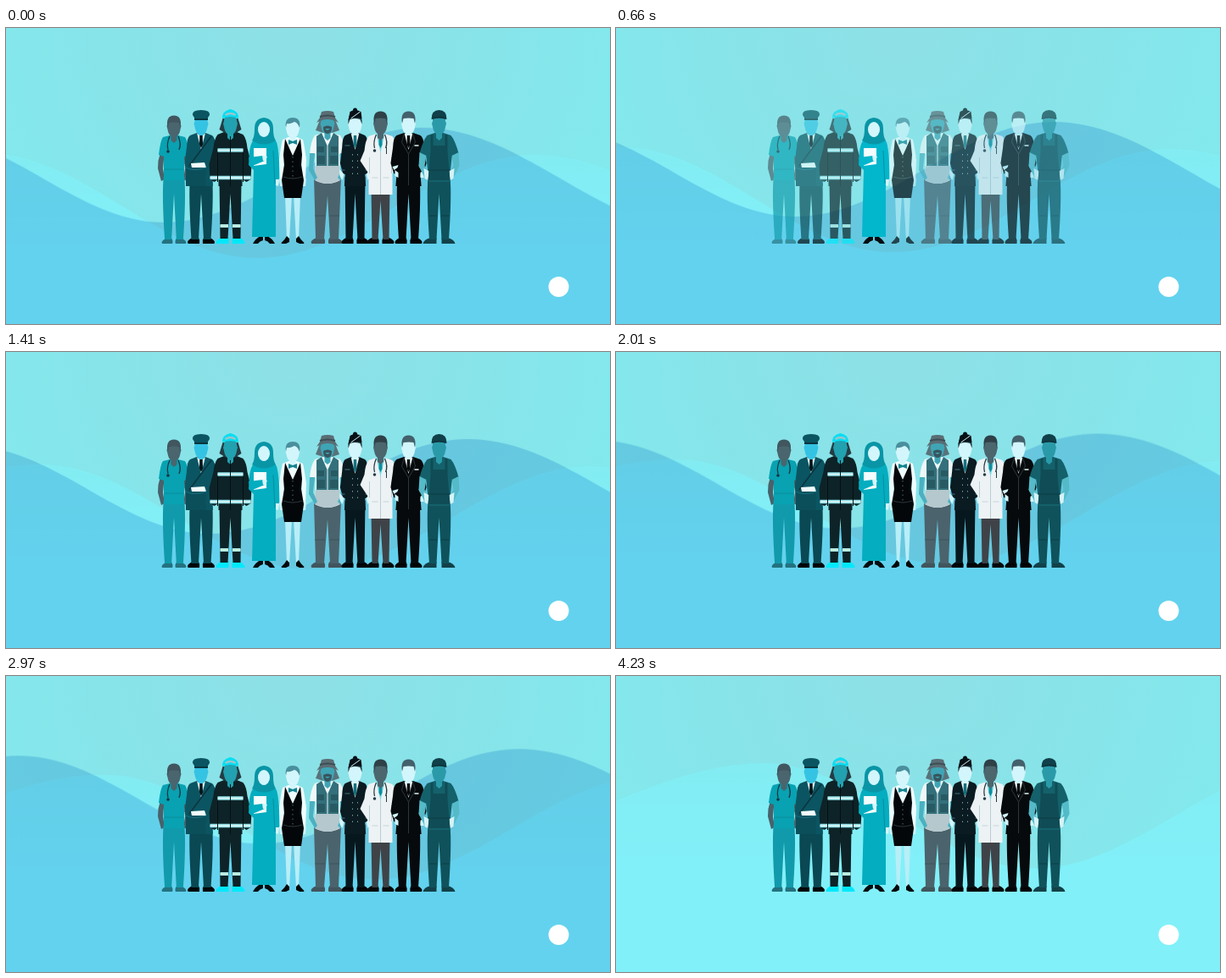
Recreate the animation shown at these times as an HTML page without scripts. Size 712 px wide and 350 px high, loop 4260 ms.

```html
<!DOCTYPE html>
<html lang="en">
<head>
<meta charset="utf-8">
<title>Team on the waves</title>
<style>
html, body { margin: 0; width: 100%; height: 100%; overflow: hidden; background: #82eaee; }
svg { display: block; width: 712px; height: 350px; }
.light { fill: url(#glow); animation: drift 4.26s linear infinite; }
.dark { fill: #c2dff4; mix-blend-mode: multiply; animation: rise 4.26s linear infinite; }
.crew { animation: appear 4.26s linear infinite; }
.robed { animation: appear-fast 4.26s linear infinite; }
.robe { fill: #04adbf; animation: tint 4.26s linear infinite; }
@keyframes drift {
  to { transform: translate(200px, -45px); }
}
@keyframes rise {
  0% { transform: none; opacity: 1; }
  70.42% { transform: translate(116px, -32px); opacity: 1; }
  88.73% { transform: translate(116px, -32px); opacity: 1; }
  99.3%, 100% { transform: translate(116px, -32px); opacity: 0; }
}
@keyframes appear {
  0%, .69% { opacity: 1; }
  .7% { opacity: .08; }
  23.5%, 100% { opacity: 1; }
}
@keyframes appear-fast {
  0%, .69% { opacity: 1; }
  .7% { opacity: .08; }
  10%, 100% { opacity: 1; }
}
@keyframes tint {
  0%, .69% { fill: #04adbf; }
  .7%, 10% { fill: #00bfd9; }
  21%, 100% { fill: #04adbf; }
}
</style>
</head>
<body>
<svg viewBox="0 0 712 350" width="712" height="350">
  <defs>
    <radialGradient id="sky" gradientUnits="userSpaceOnUse" cx="340" cy="-10" r="440">
      <stop offset="0" stop-color="#8ee0e6"/>
      <stop offset=".5" stop-color="#87e4e9"/>
      <stop offset="1" stop-color="#82eaee"/>
    </radialGradient>
    <linearGradient id="glow" gradientUnits="userSpaceOnUse" x1="0" y1="140" x2="0" y2="260">
      <stop offset="0" stop-color="#83ecf2"/>
      <stop offset="1" stop-color="#82f0f9"/>
    </linearGradient>
    <path id="legs" d="M-13 176H13Q15 200 11.500 250H3L0 196L-3 250H-11.500Q-15 200-13 176Z"/>
    <path id="shoes" d="M-16 253Q-15 250-10 248H-3Q-1 251-2 255H-15Q-16 255-16 253ZM16 253Q15 250 10 248H3Q1 251 2 255H15Q16 255 16 253Z"/>
    <path id="head" d="M-7.500 110Q-8 103 0 103T7.500 110L8.500 113L7.500 117Q6.500 123 3.500 125V130L0 133L-3.500 130V125Q-6.500 123-7.500 117L-8.500 113Z"/>
    <path id="hair" d="M-7.500 113Q-10 98.500 0 98.500T7.500 113L6 107Q0 106-6 107Z"/>
    <path id="coat" d="M-5 124L-13 127Q-16.500 129-17 141L-19.500 160L-16 172L-13 173L-14 187H14L13 173L16 172L19.500 160L17 141Q16.500 129 13 127L5 124Z"/>
    <path id="collar" d="M-5 124L0 144L5 124L2 127H-2Z"/>
    <path id="tie" d="M-1.700 127H1.700L2 138L0 142L-2 138Z"/>
    <path id="hands" d="M-18 167Q-20 174-15 180L-13 173ZM18 167Q20 174 15 180L13 173Z"/>
    <path id="tube" d="M-5 126Q-9 135-7 142M5 126Q9 135 6 142" fill="none" stroke-width="1.300"/>
  </defs>

  <rect width="712" height="350" fill="url(#sky)"/>
  <path class="light" d="M-380 240C-251 240-154 148-25 148C92 148 178 272 295 272C414 272 503 150 622 150C738 150 824 250 940 250V420H-380Z"/>
  <path class="dark" d="M-390 230C-284 230-206 126-100 126C4 126 82 230 186 230C297 230 379 118 490 118C608 118 697 238 815 238V420H-390Z"/>

  <g class="crew">
    <!-- nurse -->
    <g transform="translate(198)">
      <path d="M-14 140L-18.500 157L-19 166L-15 181L-11 179L-13 166L-11 145ZM14 140L18 157V166L15 181L11 179L13 166L11 145Z" fill="#47626b"/>
      <use href="#shoes" transform="translate(0 25.500) scale(.9)" fill="#23727f"/>
      <use href="#legs" transform="scale(.95 1)" fill="#119aab"/>
      <path d="M-5 127L-13 129Q-16 133-18 150L-12 152V180H12V152L18 150Q16 133 13 129L5 127Z" fill="#08a2b2"/>
      <path d="M-11 167H11" stroke="#0a8c9a"/>
      <use href="#head" y="3" fill="#4a656e"/>
      <use href="#hair" y="5" fill="#41565f"/>
      <use href="#tube" y="2" stroke="#123640"/>
      <circle cx="-7" cy="146" r="1.800" fill="#123640"/>
    </g>

    <!-- mail carrier -->
    <g transform="translate(230)">
      <use href="#shoes" fill="#020506"/>
      <use href="#legs" fill="#0a4853"/>
      <use href="#coat" fill="#0b5562"/>
      <use href="#head" fill="#35c3e4"/>
      <path d="M-10 103Q-11 97 0 97T10 103L8 106V109H-8V106Z" fill="#0b5562"/>
      <path d="M-8 108H8" stroke="#0a3640" stroke-width="2"/>
      <use href="#collar" fill="#e8fafc"/>
      <use href="#tie" fill="#04151a"/>
      <path d="M12 128L-14 163" stroke="#0a343e" stroke-width="1.500"/>
      <path d="M-18 164H6V187H-18Z" fill="#0b4f5b"/>
      <path d="M-12 160L4 159L6 165H-11Z" fill="#f1fcfd"/>
      <path d="M-18 165Q-9 170 6 165" stroke="#127485" fill="none"/>
      <path d="M18 166Q20 174 15 180L13 176Z" fill="#35c3e4"/>
    </g>

    <!-- firefighter -->
    <g transform="translate(264.500)">
      <path d="M-17 255Q-17 250-9 247H-2V255ZM17 255Q17 250 9 247H2V255Z" fill="#00e9fb"/>
      <path d="M-13 180H13L12 249H3L0 196L-3 249H-12Z" fill="#0d2327"/>
      <path d="M-12 234H-2.500M2.500 234H12" stroke="#a9e6ea" stroke-width="4"/>
      <path d="M-12 234H-2.500M2.500 234H12" stroke="#dff6bd" stroke-width="1"/>
      <path d="M-5 122L-15 126Q-19 131-20 142L-25 161L-24 179L-19 182L-14 179V187H14V179L19 182L24 179L25 161L20 142Q19 131 15 126L5 122Z" fill="#0d2327"/>
      <path d="M-9 107L-13 120L-5 125H5L13 120L9 107Z" fill="#253c44"/>
      <use href="#head" fill="#22a1b0"/>
      <path d="M-9.500 107Q-10 98 0 96Q10 98 9.500 107Q0 103-9.500 107Z" fill="#05def3"/>
      <path d="M-6 103Q0 99 6 103" stroke="#9fc4ca" stroke-width="2.500" fill="none"/>
      <path d="M-15 144.500H15M-24 177H24" stroke="#8fe0e7" stroke-width="4.500"/>
      <path d="M-15 144.500H15M-24 177H24" stroke="#e5f9fa" stroke-width="1.300"/>
      <path d="M0 128V187M-15 147V182M15 147V182" stroke="#061013"/>
    </g>
  </g>

  <!-- veiled woman -->
  <g class="robed" transform="translate(304)">
    <path d="M-13 255Q-10 249-4 246H-1V251Q-5 252-7 255ZM13 255Q10 249 4 246H1V251Q5 252 7 255Z" fill="#040c0f"/>
    <path class="robe" d="M-7 129Q-15 131-17 146L-18 162L-12 168L-14 247H14V184L18 180Q19 150 15 135Q12 130 7 129Z"/>
    <path d="M11 145L13 184" stroke="#058fa0"/>
    <path d="M0 106Q-11 107-11 119Q-11 129-14 133Q0 142 14 133Q11 129 11 119Q11 107 0 106Z" fill="#0995a6"/>
    <ellipse cy="120" rx="7" ry="9" fill="#d2f6fc"/>
    <path d="M-12 142H3V161L-12 163Z" fill="#f2fdfe"/>
    <path class="robe" d="M-18 153L-1 151L1 157L-16 164Z"/>
    <path d="M-2 151L4 152L2 157H-1ZM14 179H18L17 187L14 186Z" fill="#d2f6fc"/>
  </g>

  <g class="crew">
    <!-- waitress -->
    <g transform="translate(338)">
      <path d="M-9 198H-1L-4 250H-7ZM9 198H1L4 250H7Z" fill="#b8eef7"/>
      <path d="M-13.500 254Q-9 250-7 246L-4 249V253L-8 255H-13ZM13.500 254Q9 250 7 246L4 249V253L8 255H13Z" fill="#030708"/>
      <path d="M-5 129L-12 132Q-14 140-16 156L-15 180H-11L-10 150H10L11 180H15L16 156Q14 140 12 132L5 129Z" fill="#eefcfe"/>
      <path d="M-16 178H-11L-12 187H-15ZM16 178H11L12 187H15Z" fill="#cdf4fa"/>
      <path d="M-9 131L0 151L9 131L11 150L10 162L13 180L10 201H-10L-13 180L-10 162L-11 150Z" fill="#040709"/>
      <path d="M-11 176Q0 180 11 176" stroke="#2a383d" fill="none"/>
      <use href="#head" y="4" fill="#d2f6fc"/>
      <path d="M-8 118Q-10 106 0 106T8 118Q6 112 2 111Q-4 114-7 113Z" fill="#4a8f9d"/>
      <path d="M-5 132L0 134L5 132V138L0 136L-5 138Z" fill="#15838f"/>
      <path d="M0 152V176" stroke="#536a72" stroke-dasharray="1.500 4"/>
    </g>

    <!-- angler -->
    <g transform="translate(379)">
      <use href="#shoes" transform="translate(-1) scale(1.150 1)" fill="#41555c"/>
      <path d="M-16 176H16L13 250H3L0 198L-4 250H-14Z" fill="#4b636c"/>
      <path d="M-15 222H-3M2 222H14" stroke="#3c535c"/>
      <path d="M-5 124L-15 127Q-20 134-21 149H-14L-15 180Q0 188 15 180L14 149H21Q20 134 15 127L5 124Z" fill="#edf7f8"/>
      <path d="M-14 163H14L16 179Q0 189-16 179Z" fill="#b4c8cd"/>
      <path d="M-21 148H-15L-17 166L-12 177L-15 180L-22 168ZM21 148H15L17 166L12 177L15 180L22 168Z" fill="#4bb0c0"/>
      <path d="M-7 124L-13 128V163H-.500V139ZM7 124L13 128V163H.500V139Z" fill="#33707b"/>
      <path d="M-12 140H-4V147H-12ZM4 140H12V147H4ZM-12 151H-3V161H-12ZM3 151H12V161H3Z" fill="#285a64"/>
      <path d="M-8 106L-14 121L-5 124H5L14 121L8 106Z" fill="#59727a"/>
      <use href="#head" fill="#3fa5b5"/>
      <path d="M-5 117Q0 114 5 117Q5 125 0 125T-5 117Z" fill="#37565f"/>
      <path d="M-3 119H3L0 121Z" fill="#3fa5b5"/>
      <path d="M-9 106L-7 99Q0 97 7 99L9 106L13 112Q0 104-13 112Z" fill="#5a6d74"/>
      <path d="M-9 105Q0 102 9 105" stroke="#3c4d54" stroke-width="2" fill="none"/>
    </g>

    <!-- cabin officer -->
    <g transform="translate(411.500)">
      <use href="#shoes" fill="#020406"/>
      <path d="M-12 176H12L11 250H3L0 196L-3 250H-11Z" fill="#06181e"/>
      <use href="#coat" transform="scale(.9 1)" fill="#0a1b21"/>
      <use href="#head" fill="#d2f6fc"/>
      <path d="M-8 114Q-9 100 0 100T8 114L6 108Q0 106-6 108Z" fill="#17323c"/>
      <path d="M-8 109L-6 99Q0 95 7 99L8 107Q0 103-8 109Z" fill="#061116"/>
      <circle cy="97" r="2.500" fill="#061116"/>
      <path d="M-5 107L6 99" stroke="#cdeff4"/>
      <use href="#collar" fill="#e9f9fb"/>
      <use href="#tie" fill="#14707d"/>
      <path d="M-3 149V174M3 149V174" stroke="#7b9aa3" stroke-dasharray="1.500 6"/>
      <path d="M-12 139H-6M-16 168H-12M12 168H16" stroke="#3d7380"/>
      <use href="#hands" fill="#d2f6fc"/>
    </g>

    <!-- doctor -->
    <g transform="translate(441.500)">
      <use href="#shoes" fill="#050809"/>
      <path d="M-11 190H11L10 250H3L0 204L-3 250H-10Z" fill="#3f4347"/>
      <path d="M-5 125L-14 128Q-18 133-19 145L-24 157L-14 172V197H14V172L21 157L19 145Q18 133 14 128L5 125Z" fill="#edf2f4"/>
      <path d="M0 146V197M-13 153L-13 172M13 153L13 172" stroke="#b9cdd3"/>
      <path d="M-10 177H-3M3 177H10" stroke="#c4d7db"/>
      <path d="M-5 125L0 148L5 125Z" fill="#7edbe6"/>
      <use href="#tie" fill="#0d8f9e"/>
      <use href="#head" fill="#4c666e"/>
      <use href="#hair" fill="#2f4047"/>
      <use href="#tube" stroke="#263b43"/>
      <circle cx="-7" cy="145" r="1.800" fill="#263b43"/>
      <path d="M7 141V149" stroke="#263b43"/>
    </g>

    <!-- businessman -->
    <g transform="translate(474.500)">
      <use href="#shoes" fill="#020303"/>
      <use href="#legs" fill="#070a0c"/>
      <use href="#coat" transform="scale(1.080 1)" fill="#070a0c"/>
      <use href="#head" fill="#d2f6fc"/>
      <use href="#hair" fill="#43606b"/>
      <use href="#collar" fill="#f2fcfd"/>
      <use href="#tie" fill="#070a0c"/>
      <path d="M-5 124L-8 135L0 149L8 135L5 124M0 149V186" fill="none" stroke="#2a363b"/>
      <path d="M7 139H12" stroke="#dff5f8" stroke-width="1.500"/>
      <path d="M-19 164L-12 162L-13 165L-17 168ZM19 164L12 162L13 165L17 168ZM-16 168L-12 171V177L-16 175ZM18 168L14 171V177L18 177Z" fill="#d2f6fc"/>
    </g>

    <!-- mechanic -->
    <g transform="translate(510.500)">
      <path d="M-19 255Q-18 250-10 248H-3V255ZM19 255Q18 250 10 248H3V255Z" fill="#124149"/>
      <use href="#legs" fill="#10525b"/>
      <path d="M-5 124L-14 127Q-19 133-23 148L-15 153L-12 182H12L15 153L23 148Q19 133 14 127L5 124Z" fill="#14616b"/>
      <path d="M-23 147L-15 151L-17 163L-12 172L-16 179L-24 163ZM23 147L15 151L17 163L12 172L16 179L24 163Z" fill="#55bac8"/>
      <path d="M-18 166L-12 169L-13 180L-17 178ZM18 166L12 169L13 180L17 178Z" fill="#d5f4f8"/>
      <path d="M-10 126H-7V139H7V126H10V146L13 180H-13L-10 146Z" fill="#104c55"/>
      <path d="M-13 168H13M-12 222H-3M3 222H12" fill="none" stroke="#0b3d45"/>
      <use href="#head" fill="#2b9aa8"/>
      <path d="M-9 108Q-9 97 0 97T9 108Q0 105-9 108Z" fill="#104049"/>
      <path d="M-8 107Q0 104 8 107" stroke="#0d323b" stroke-width="1.500" fill="none"/>
    </g>
  </g>

  <circle cx="651.500" cy="306" r="12" fill="#fff"/>
</svg>
</body>
</html>
```
